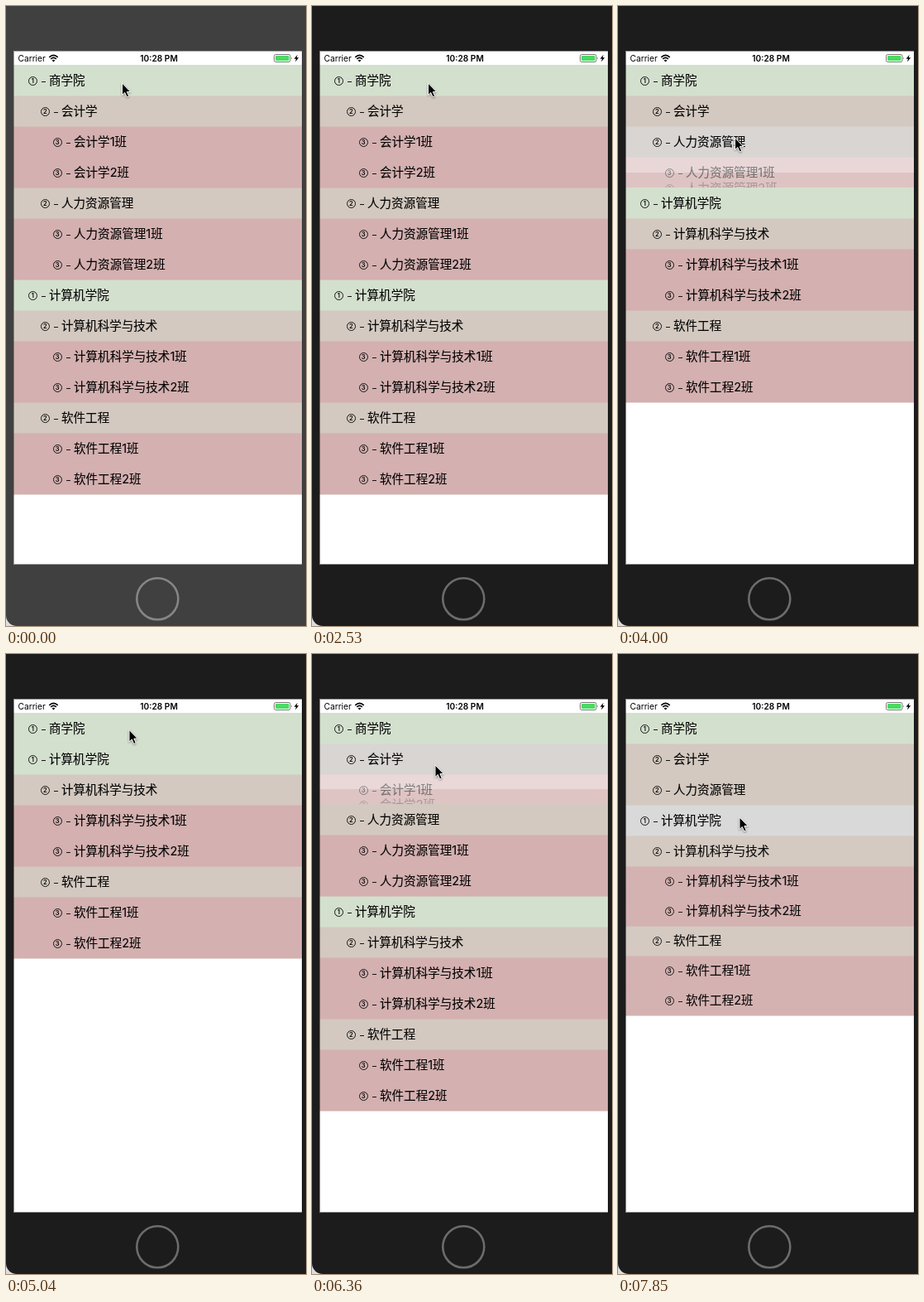
Write an HTML page that moves like this. It is 363 by 748 pixels and loops after 8000 ms.

```html
<!DOCTYPE html>
<html lang="zh-CN">
<head>
<meta charset="utf-8">
<title>Course tree</title>
<style>
  html, body { margin: 0; width: 100%; height: 100%; overflow: hidden; background: #ddd; }
  #phone { position: absolute; left: 0; top: 0; width: 363px; height: 748px; overflow: hidden;
    border-bottom-left-radius: 13px; background: var(--bezel); --bezel: #1c1c1c; --ring: #6c6c6c; }
  #phone.idle { --bezel: #404040; --ring: #868686; }
  #screen { position: absolute; left: 9px; top: 54px; width: 349px; height: 620px; background: #fff; }
  /* The screen's edges fall halfway through a pixel. */
  #screen::after { content: ""; position: absolute; inset: 0; z-index: 1;
    border: 1px solid color-mix(in srgb, var(--bezel) 50%, transparent); border-right: 0; }
  #list { position: absolute; left: 0; top: 17px; width: 100%; height: 603px; overflow: hidden; z-index: 0; }
  #art { position: absolute; left: 0; top: 0; z-index: 2; }
  #art text { font-family: Inter, "Liberation Sans", sans-serif; }
  .row { position: absolute; left: 0; top: 0; width: 100%; height: 37px; color: #050505;
    font: 14.55px/38px Inter, "Noto Sans CJK SC", "Noto Sans CJK", sans-serif; white-space: nowrap;
    --fill: color-mix(in srgb, #d9d9d9 var(--glow, 0%), var(--tint));
    background: var(--fill); box-shadow: 0 1px color-mix(in srgb, var(--fill) 50%, transparent); }
  .row > * { position: absolute; top: 0; }
  .row i { left: 17.5px; top: 13.5px; box-sizing: border-box; width: 11.5px; height: 11.5px;
    border: 1px solid #151515; border-radius: 50%; font-style: normal; font-weight: 600;
    font-size: 7.5px; line-height: 9.5px; text-align: center; }
  .row b { left: 34px; top: 19.5px; width: 5px; height: 1.2px; background: #151515; }
  .row span { left: 43px; -webkit-text-stroke: .12px; }
</style>
</head>
<body>
<div id="phone">
  <div id="screen"><div id="list"></div></div>
  <svg id="art" width="363" height="748">
    <text x="14.5" y="66.7" font-size="10.2">Carrier</text>
    <g fill="none" stroke="#000" stroke-width="1.7">
      <path d="M52.3 61.8Q57.5 56.8 62.7 61.8M54.2 64Q57.5 60.7 60.8 64"/>
    </g>
    <path d="M57.5 67.6L55.6 65.6Q57.5 63.9 59.4 65.6Z"/>
    <text x="185" y="66.7" font-size="10.2" font-weight="600" text-anchor="middle">10:28 PM</text>
    <rect x="324.5" y="58.5" width="19.5" height="9" rx="2" fill="#fff" stroke="#777"/>
    <rect x="326" y="60" width="16.5" height="6" rx="1" fill="#4cd964"/>
    <path d="M345.3 61.5q1.7 1.5 0 3z" fill="#777"/>
    <path d="M352.6 58.8L348.6 63.7H351L350 67.5L354.2 62.3H351.7Z"/>
    <circle cx="183.3" cy="715.3" r="25" fill="none" stroke="var(--ring)" stroke-width="2.6"/>
    <path id="cursor" d="M.5 0V14.6L3.8 11.5L6.2 17L8.8 15.9L6.4 10.6H10.8Z"
      stroke="#fff" stroke-width="1" style="filter:drop-shadow(0 1px 1px #0006)"/>
  </svg>
</div>
<script>
const LOOP = 8000, ROW = 37;
const TINTS = ['#d4e0ce', '#d3c9c0', '#d4b0b0'];
const phone = document.getElementById('phone');
const list = document.getElementById('list');
const cursor = document.getElementById('cursor');
const rows = [];

function makeRow(name, level = 0, children = []) {
  const el = document.createElement('div');
  el.className = 'row';
  el.style.setProperty('--tint', TINTS[level]);
  el.innerHTML = `<i>${level + 1}</i><b></b><span>${name}</span>`;
  for (const part of el.children) part.style.marginLeft = level * 15 + 'px';
  list.append(el);
  const row = { el, index: rows.length, folds: [[0, 0]], children: [] };
  rows.push(row);
  row.children = children.map(([title, kids]) => makeRow(title, level + 1, kids));
  return row;
}

const course = name => [name, [[name + '1班'], [name + '2班']]];
const colleges = [
  makeRow('商学院', 0, ['会计学', '人力资源管理'].map(course)),
  makeRow('计算机学院', 0, ['计算机科学与技术', '软件工程'].map(course))
];
const [business, computing] = colleges;
const [accounting, staffing] = business.children;

// Fold amounts: 0 is open, 1 is closed; each holds until the next.
const close = (t, mid = .5) => [[t, .027], [t + 140, mid], [t + 290, 1]];
const open = t => [[t, .973], [t + 140, .5], [t + 290, 0]];
business.folds.push([1640, .5], [1790, 1], ...open(2240), ...close(4740), ...open(5330));
accounting.folds.push(...close(3120), [5040, 0], ...close(6220, .514));
staffing.folds.push(...close(3850), [5040, 0], ...close(7110));
computing.folds.push([7850, .027]);

// Row, press time, release time
const touches = [
  [business, 1490, 1640], [accounting, 3120, 3260], [staffing, 3850, 3990],
  [accounting, 6220, 6360], [staffing, 7110, 7250], [computing, 7550, LOOP]
];

// Time, x, y
const moves = [
  [0, 140, 93], [2680, 141, 112], [2830, 142, 130], [3560, 142, 146], [3710, 141, 159],
  [4150, 143, 121], [4290, 148.5, 91.5], [5770, 148.5, 112], [5920, 148.5, 134],
  [6660, 149, 147], [6810, 148, 163], [7400, 147, 180], [7550, 146.5, 197]
];

const held = (track, t) => track.findLast(key => key[0] <= t);

// Places a row and its children; returns the height they take up.
function place(row, t, y, scale, alpha) {
  const { style } = row.el;
  style.transform = `translateY(${Math.round(y)}px)`;
  style.opacity = alpha;
  style.zIndex = (alpha < 1 ? 0 : 100) + rows.length - row.index;
  const shown = 1 - held(row.folds, t)[1];
  let height = ROW * scale;
  for (const child of row.children)
    height += place(child, t, y + height, scale * shown, alpha * shown);
  return height;
}

function glow(row, t) {
  const touch = touches.find(([r, down, up]) => r === row && t >= down && t < up + 150);
  return !touch ? 0 : t < touch[2] ? 100 : 75;
}

function draw(now) {
  const t = now % LOOP;
  phone.classList.toggle('idle', t < 1490);
  let y = 0;
  for (const college of colleges) y += place(college, t, y, 1, 1);
  for (const row of rows) row.el.style.setProperty('--glow', glow(row, t) + '%');
  const [, cx, cy] = held(moves, t);
  cursor.setAttribute('transform', `translate(${cx} ${cy})`);
}

const start = performance.now();
function tick() {
  draw(performance.now() - start);
  requestAnimationFrame(tick);
}
tick();
</script>
</body>
</html>
```
